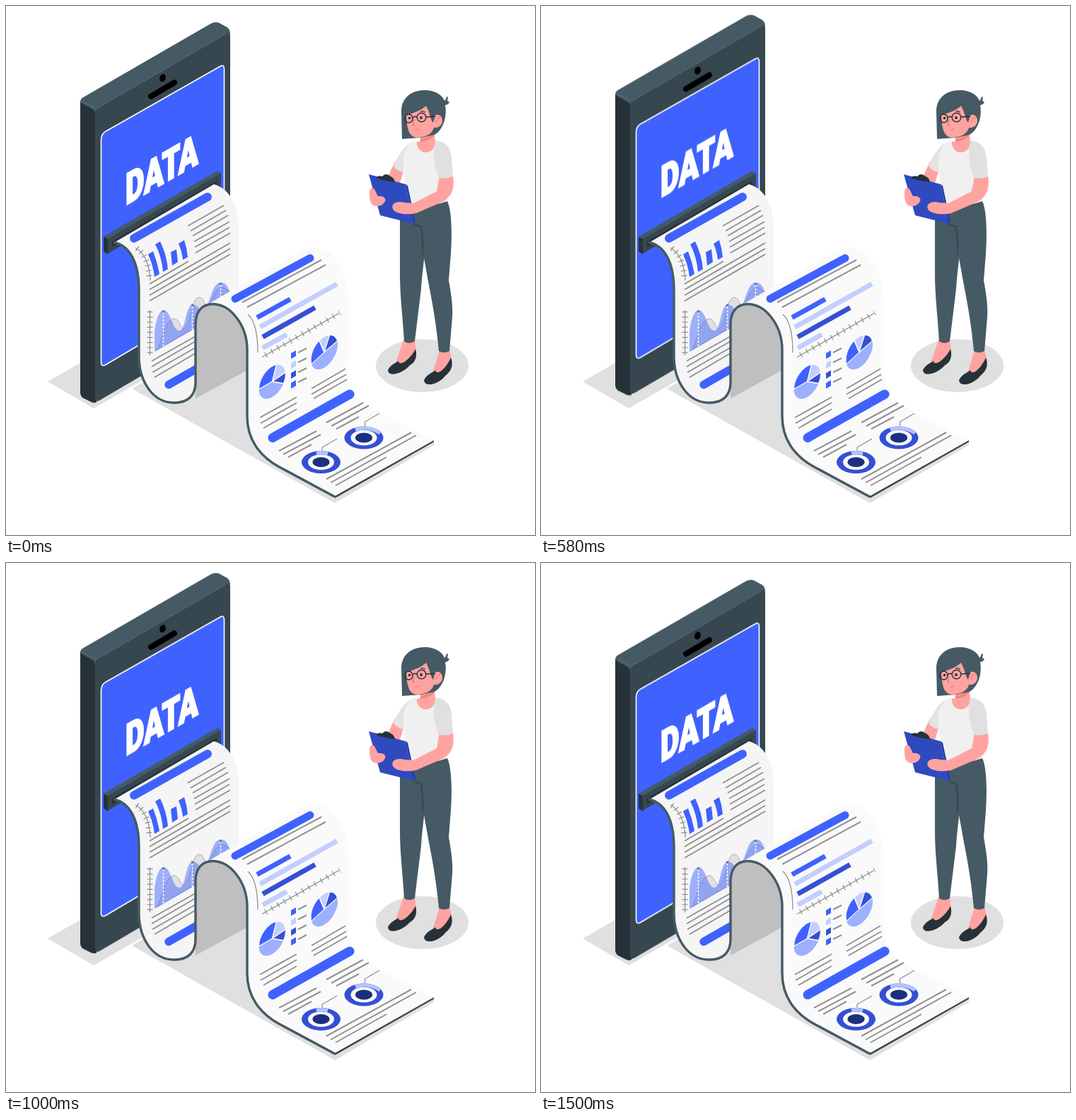
Recreate the animation shown at these times as an HTML page. Size 748 px wide and 748 px high, loop 1.54 s.

```html
<!DOCTYPE html>
<html lang="en">
<head>
<meta charset="utf-8">
<title>Data report</title>
<style>
html, body { margin: 0; width: 100%; height: 100%; overflow: hidden; background: #fff; }
svg { display: block; width: 100vw; height: 100vh; }
.phone { animation: float 1540ms infinite; }
/* 37 held steps: 18 going up, 19 coming down */
@keyframes float {
  0% { transform: translateY(-.81px); animation-timing-function: steps(18, end); }
  48.6486% { transform: translateY(-15.4px); animation-timing-function: steps(1, start); }
  48.6487% { transform: translateY(-14.6px); animation-timing-function: steps(19, end); }
  100% { transform: translateY(.81px); }
}
.title { font: 900 61px Roboto, "Open Sans", sans-serif; fill: #fff; stroke: #fff; stroke-width: 2.6; }
.blue { fill: #3f62ff; }
.deep { fill: #3450d4; }
.mid { fill: #9db0ff; }
.pale { fill: #c3ceff; }
.navy { fill: #1b2f80; }
.slate { fill: #455a64; }
.steel { fill: #37474f; }
.ink { fill: #263238; }
.skin { fill: #ffa3a1; }
.floor { fill: #e0e0e0; }
.text, .axis, .tick, .bar, .chart, .thin { fill: none; }
.text { stroke: #919191; stroke-width: 2; }
.axis { stroke: #8c8c8c; stroke-width: 1.2; }
.tick { stroke: #8c8c8c; stroke-width: 8; }
.bar { stroke: #3f62ff; stroke-linecap: round; }
.chart { stroke-width: 7; }
.pie path { stroke: #fafafa; stroke-width: 1.5; }
.thin { stroke: #263238; stroke-width: 1.4; stroke-linecap: round; }
</style>
</head>
<body>
<svg viewBox="0 0 748 748">
  <defs>
    <path id="sheet" d="M152 335L294 252C318 259 329 285 329 312V400L285 423C275 427 268 435 268 450V532C268 550 258 562 238 562C207 562 188 530 188 495V402C188 364 176 339 152 335Z"/>
    <clipPath id="fold"><use href="#sheet"/></clipPath>
    <g id="ring">
      <ellipse class="deep" rx="27.5" ry="16"/>
      <ellipse fill="#fafafa" rx="18.5" ry="10.8"/>
      <ellipse class="navy" rx="12" ry="7"/>
    </g>
  </defs>

  <g class="floor">
    <path d="M59 531L124 569L310 462L245 424Z"/>
    <path d="M178 541L341 447L484 540L512 570L605 616V621L465 703Z"/>
    <ellipse cx="588.5" cy="508.5" rx="65.5" ry="37.5"/>
  </g>

  <g class="phone">
    <path class="ink" d="M105 135L128 143V561Q124 563 119 560L109 555Q105 552 105 547Z"/>
    <path class="slate" d="M105 137Q105 132 109 130L289 26Q296 22 302 25L313 31Q317 34 317 40L126 149Z"/>
    <path class="steel" d="M126 153Q126 147 131 144L310 40Q317 36 317 43V445Q317 450 312 453L133 558Q126 562 126 555Z"/>
    <path d="M107 135L124 144Q127 146 126 152M128 146L311 40" fill="none" stroke="#6b7d86" stroke-width=".7"/>
    <path class="blue" stroke="#fff" stroke-width="1.6" d="M134.5 190Q134.5 182 141 178L303 86Q308.5 83 308.5 90V402Q308.5 409 302 413L141 508Q134.5 512 134.5 504Z"/>
    <ellipse cx="221.5" cy="102.5" rx="4.3" ry="5.6" transform="rotate(20 221.5 102.5)"/>
    <path d="M205 128.5L238 109" stroke="#000" stroke-width="8" stroke-linecap="round"/>
    <text class="title" transform="matrix(.67 -.385 0 1 169 282.5)">DATA</text>
  </g>

  <g>
    <path class="ink" d="M138 326L144 329V351L138 347Z"/>
    <path class="slate" d="M138 326L299 233L304 236L144 329Z"/>
    <path class="steel" d="M144 329L304 236V257L144 350Z"/>
    <path class="ink" d="M150 333L298 247.5V256L150 341Z"/>
  </g>

  <use href="#sheet" fill="#f5f5f5"/>
  <g clip-path="url(#fold)">
    <path class="bar" stroke-width="12" d="M181 328.5L285 270"/>
    <path class="text" d="M257 311l51-29M261 318l50-29M264 325l50-29M266 333l50-28M267 341l49-28M268 349l49-28
      M203 393l55-32M203 401l114-66M203 409l114-66M203 417l114-66"/>
    <path class="axis" d="M183 342C197 350 203 368 204 388M203.5 430V494"/>
    <path class="tick" stroke-dasharray="1.2 6" d="M185 343C198 351 202 368 203 388M203.5 432V494"/>
    <path class="blue" d="M201 351l7-4Q214 362 217 379l-7 4Q208 366 201 351ZM211 337l7-4Q227 351 229 372l-7 4Q220 354 211 337ZM233 348l8-4 2 18-8 5ZM244 336l8-5Q256 343 257 355l-7 4Q249 348 244 336Z"/>
    <path d="M212 487C220 482 222 446 237 442C247 442 246 460 253 455C262 447 262 413 273 412C283 413 279 430 288 421C295 409 297 398 307 398L317 404V426Z" fill="#8c8c8c" fill-opacity=".2" stroke="#a8a8b0"/>
    <path class="blue" opacity=".48" d="M210 489V462C212 440 218 430 223 430C234 431 235 460 246 459C254 457 254 423 264 422C276 422 273 441 282 428C291 413 292 391 304 391C311 391 314 397 316 404V428Z"/>
    <path d="M222.5 433V481M263.5 425V458M303.5 394V414" stroke="#fff" stroke-width="1.5" stroke-dasharray="3 2"/>
    <g fill="#707580"><circle cx="222.5" cy="432" r="1.8"/><circle cx="263.5" cy="423" r="1.8"/><circle cx="303.5" cy="393" r="1.8"/></g>
    <path class="text" d="M206 502l62-35M206 510l62-36M207 518l61-35M210 525l58-34"/>
    <path class="bar" stroke-width="11.5" d="M230 535.5L285 504"/>
  </g>

  <path fill="#bfbfbf" d="M268 555V450C268 430 278 421 292 421C318 421 341 450 341 480V515Z"/>
  <path class="steel" d="M465 692L605 613.5V616.5L465 696Z"/>
  <path fill="#fafafa" d="M285 422L422 343C456 330 484 370 484 415V510C484 535 492 553 512 566L605 614L465 693L385 651C358 636 341 612 341 580V486C341 455 318 421 285 422Z"/>
  <path d="M152 334C176 339 188 364 188 402V495C188 530 207 561 238 561C258 561 268 550 268 532V450C268 431 278 421.5 292 421.5C318 421.5 341 452 341 486V580C341 612 358 636 385 651L465 694" fill="none" stroke="#455a64" stroke-width="3.4"/>

  <path class="bar" stroke-width="11" d="M324 414L430 356.5"/>
  <path class="text" d="M334 419l112-60M341 426l111-60"/>
  <path class="axis" d="M342 436C352 445 356 464 356 490M362 496.5L471 434.5"/>
  <path class="tick" stroke-dasharray="1.2 8.8" d="M367 493.5L472 434"/>
  <g class="chart">
    <path stroke="#3f62ff" d="M355 440.5L402 414.5"/>
    <path stroke="#c3ceff" d="M359 454L468 393"/>
    <path stroke="#3450d4" d="M363 468L437 426.5"/>
    <path stroke="#c3ceff" d="M363 483.5L397 464.5"/>
  </g>

  <g class="pie" transform="matrix(.866 -.5 0 1 376.5 531)">
    <circle class="mid" r="22"/>
    <path class="blue" d="M0 0L-22 0A22 22 0 0 1 7-20.9Z"/>
    <path class="pale" d="M0 0L7-20.9A22 22 0 0 1 22-2Z"/>
    <path class="deep" d="M0 0L22-2A22 22 0 0 1 18.4 12Z"/>
  </g>
  <g class="pie" transform="matrix(.866 -.5 0 1 450 489.5)">
    <circle class="mid" r="22"/>
    <path class="blue" d="M0 0L-21 6.5A22 22 0 0 1-8-20.5Z"/>
    <path class="pale" d="M0 0L-8-20.5A22 22 0 0 1 9-20Z"/>
    <path class="deep" d="M0 0L9-20A22 22 0 0 1 21.5-5Z"/>
  </g>

  <path class="blue" d="M403 491l7-4v8l-7 4Z"/>
  <path class="pale" d="M403 505l7-4v8l-7 4Z"/>
  <path class="deep" d="M403 519l7-4v8l-7 4Z"/>
  <path class="blue" d="M403 533l7-4v8l-7 4Z"/>
  <path class="text" d="M413 490l12-6M413 504l12-6M413 518l12-6M413 532l12-6
    M432 541l48-28M432 549l49-28M435 555l47-27
    M359 582l52-29M360 590l51-29M364 597l47-27
    M453 589l52-28M460 594l53-29M467 598l32-17
    M386 629l53-28M392 634l53-28M399 638l33-18
    M453 669l120-66M459 674l121-67M466 678l72-40"/>
  <path class="bar" stroke-width="13" d="M377 610.5L486 549"/>

  <use href="#ring" x="445.5" y="645"/>
  <use href="#ring" x="506" y="610.5"/>
  <g fill="none" stroke="#b4c2ff" stroke-width="5">
    <path d="M439 632.5Q447 630.5 455 633"/>
    <path d="M494 599Q514 593 529 604"/>
  </g>
  <path class="axis" d="M447 629V624L468 612M507.5 594V588L528 576"/>

  <!-- legs -->
  <g>
    <path class="skin" d="M562 472H578L580 490L560 505L549 511Z"/>
    <path class="skin" d="M613 486H627L631 503L614 519L602 524Z"/>
    <path class="ink" d="M540 515C543 508 550 505 555 502C556 511 572 499 579 485C582 495 579 504 571 508C562 519 541 526 540 515Z"/>
    <path class="ink" d="M591 529C595 521 602 519 607 515C609 524 623 512 629 497C633 508 630 516 621 523C612 535 592 540 591 529Z"/>
    <path class="slate" d="M557 300H592V345C591 365 588 380 587 400L578 474Q570 479 563 474C561 440 557 410 557 380Z"/>
    <path class="slate" d="M560 283L624 276C630 288 631 320 629 350L626 388C630 410 632 425 631 440L627 488Q619 492 612 488C609 455 604 425 598 395L589 345L585 310L560 304Z"/>
    <path d="M577 309L587 312Q590 330 589 352" fill="none" stroke="#37474f" stroke-width="2"/>
  </g>

  <!-- torso and arms -->
  <path class="skin" d="M550 220L564 228L557 250L539 247C541 238 545 230 550 220Z"/>
  <path fill="#e3e3e3" d="M579 191C566 194 557 205 548 226Q553 234 562 235L574 210Z"/>
  <path fill="#f0f0f0" d="M578 191L609 190C619 192 625 200 626 215L624 276Q600 285 567 282C570 262 560 240 562 215C564 203 570 194 578 191Z"/>
  <path class="skin" d="M585 178L605 174L607 191C607 203 600 207 593 207C586 207 580 200 581 192L586 191Z"/>
  <path d="M586 188Q598 186 604 180L605 184Q598 191 586 192Z" fill="#f28582"/>
  <path fill="#2f4abf" d="M513 238L565 252L577 308L529 296Z"/>
  <path fill="#263ca0" d="M565 252L568 254L579 306L577 308Z"/>
  <path class="ink" d="M523 243Q526 239 532 241Q537 235 544 241Q549 243 550 249Q536 248 523 243Z"/>
  <path class="skin" d="M514 262C515 257 518 256 521 259L526 269C533 268 538 272 536 276C533 283 524 285 518 281C514 277 514 270 514 262Z"/>
  <path class="skin" d="M613 240H632C635 258 630 270 617 277L580 293C568 296 550 294 547 287C544 279 553 275 564 278L576 279L609 262Z"/>
  <path fill="#e0e0e0" d="M608 191C622 191 629 201 630 215L632 241Q623 245 612 243C606 228 602 205 608 191Z"/>

  <!-- head -->
  <path class="slate" d="M560 188L559 149C559 130 573 119 592 119C607 119 617 126 620 134C622 133 622 130 623 128L625 129L624 134L627 136Q625 140 621 140C624 157 618 175 606 182L588 186Z"/>
  <path class="skin" d="M566 154C576 152 588 147 594 141C597 147 599 152 601 156L606 155C611 152 617 155 617 162C617 169 611 173 605 172C603 181 592 186 581 186C570 185 567 175 566 154Z"/>
  <path class="slate" d="M594 139L604 140L606 158L604 165C600 160 599 150 594 139Z"/>
  <path d="M608 165Q609 158 614 158" fill="none" stroke="#e97b79" stroke-width="1.2"/>
  <g class="thin">
    <ellipse cx="569.5" cy="159" rx="5.5" ry="6"/>
    <circle cx="587.5" cy="157.5" r="6.3"/>
    <path d="M575 158Q578 155 581 157M594 157L607 156M587 149Q590 148 592 150"/>
  </g>
  <g class="ink"><circle cx="570.5" cy="158.5" r="1.8"/><circle cx="587" cy="158" r="1.9"/></g>
  <path d="M577 160L575 168L578 169M579 175Q582 176 584 173" fill="none" stroke="#e36f70" stroke-width="1.2"/>
</svg>
</body>
</html>
```
